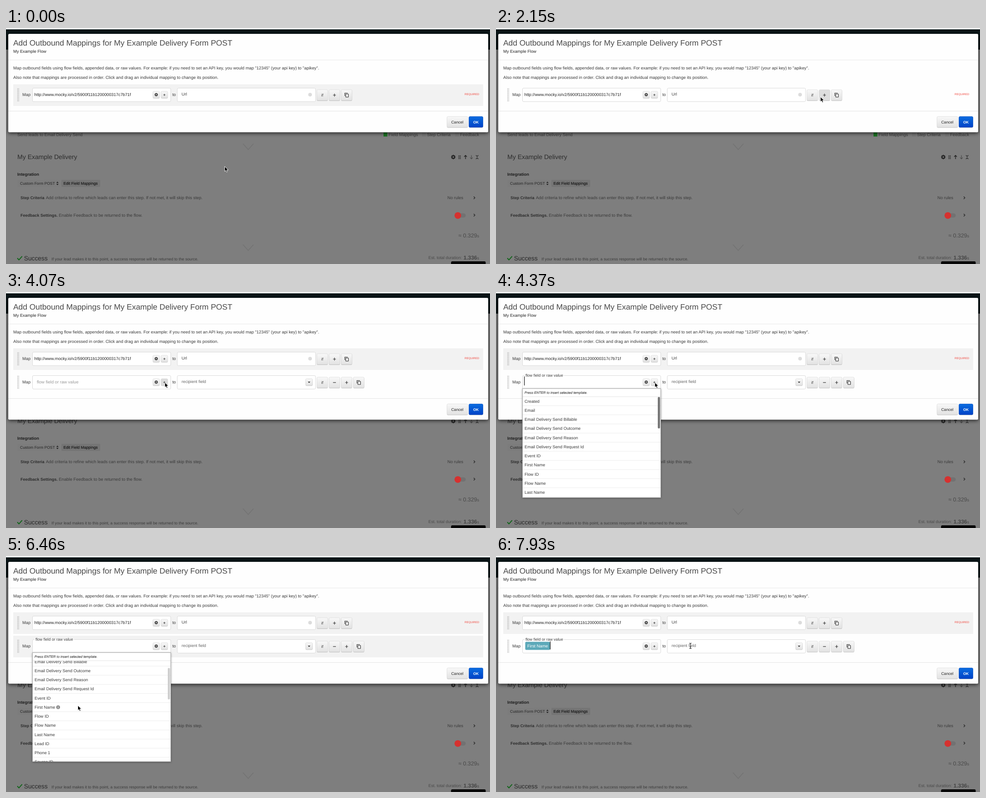
Recreate the animation shown at these times as an HTML page. Size 1068x524 px, loop 8 s.

```html
<!DOCTYPE html>
<html lang="en">
<head>
<meta charset="utf-8">
<title>Outbound mappings</title>
<style>
html, body { margin: 0; width: 100%; height: 100%; overflow: hidden; background: #7e7e7e; }
svg { display: block; width: 1068px; height: 524px; }
text { font-family: "Liberation Sans", Arial, sans-serif; text-rendering: geometricPrecision; white-space: pre; }
#sheet { filter: drop-shadow(0 2px 4px rgba(0,0,0,.75)); }
#panel { filter: drop-shadow(0 1px 2px rgba(0,0,0,.35)); }
</style>
</head>
<body>
<svg id="stage" viewBox="0 0 1068 524" xmlns="http://www.w3.org/2000/svg"></svg>
<script>
const LOOP = 8000, ITEM = 20.24;
const stage = document.getElementById('stage');
const $ = id => document.getElementById(id);

const text = (x, y, size, str, fill = '#3a3a3a', more = '') =>
  `<text x="${x}" y="${y}" font-size="${size}" fill="${fill}" ${more}>${str}</text>`;
const rect = (x, y, w, h, fill, more = '') =>
  `<rect x="${x}" y="${y}" width="${w}" height="${h}" fill="${fill}" ${more}/>`;
const line = (d, stroke, width = 1, more = '') =>
  `<path d="${d}" fill="none" stroke="${stroke}" stroke-width="${width}" ${more}/>`;
const dot = (x, y, r, fill, more = '') => `<circle cx="${x}" cy="${y}" r="${r}" fill="${fill}" ${more}/>`;
const bold = 'font-weight="700"';

function gear(x, y, r, fill) {
  let teeth = '';
  for (let i = 0; i < 8; i++) {
    const a = i * Math.PI / 4, dx = Math.cos(a) * r, dy = Math.sin(a) * r;
    teeth += `M${x + dx * 0.6} ${y + dy * 0.6}L${x + dx} ${y + dy}`;
  }
  return line(teeth, fill, r * 0.4) + dot(x, y, r * 0.56, 'none', `stroke="${fill}" stroke-width="${r * 0.42}"`);
}

function dots(x, y, cols, rows, gap, size, fill) {
  let d = '';
  for (let c = 0; c < cols; c++)
    for (let r = 0; r < rows; r++) d += `M${x + c * gap} ${y + r * gap}h${size}v${size}h${-size}z`;
  return `<path d="${d}" fill="${fill}"/>`;
}

const button = (x, y, w, h, id = '', fill = 'url(#grey)', edge = '#d2d2d2') =>
  rect(x, y + 1, w, h, '#000', 'rx="2.5" opacity=".22"') +
  rect(x, y, w, h, fill, `rx="2.5" stroke="${edge}" stroke-width=".6" ${id && `id="${id}"`}`);
const plus = (x, y, r, w) => line(`M${x - r} ${y}h${2 * r}M${x} ${y - r}v${2 * r}`, '#333', w);
const copy = (x, y) => line(`M${x - 4} ${y + 2}v-6.5h6.5`, '#333', 1.1) +
  rect(x - 2, y - 2.5, 6, 7, 'none', 'rx=".8" stroke="#333" stroke-width="1.1"');
const box = x => rect(x, 133.5, 305, 30, '#fff', 'rx="2.5" stroke="#dadada"');

function mapRow(n) {
  const extra = n === 2;
  let s = rect(16, 125, 1037, 48, '#f2f2f2', `id="band${n}"`) +
    dots(25, 134, 2, 12, 2.5, 1.2, '#a0a0a0') +
    text(36, 151.2, 9.3, 'Map') + box(58.5) + box(378) + text(367, 151.2, 9.4, 'to') +
    button(324, 140.5, 15, 15) + gear(331.5, 148, 3.7, '#333') +
    button(342, 140.5, 15, 15, 'add' + n) + plus(349.5, 148.5, 2.3, 0.9);
  s += extra
    ? text(387.5, 150.2, 9.17, 'recipient field', '#666') + button(661, 140.5, 15.5, 15) +
      '<path d="M666 147h5.6l-2.8 3z" fill="#333"/>'
    : text(62.5, 150.8, 9.26, 'http://www.mocky.io/v2/5900f11b1200000317c7b71f', '#222') +
      text(387.5, 150.2, 9.2, 'Url') + dot(671, 148, 4, '#dcdcdc');
  const tools = extra ? ['if', '-', '+', 'copy'] : ['if', '+', 'copy'];
  tools.forEach((tool, i) => {
    const x = 686 + i * 26.8, c = x + 12, y = 149;
    s += button(x, 137, 24, 24, tool === '+' ? 'plus' + n : '');
    if (tool === 'if') s += text(c, 152, 8.6, 'if', '#333', 'text-anchor="middle"');
    if (tool === '-') s += line(`M${c - 3.2} ${y}h6.4`, '#333', 1.2);
    if (tool === '+') s += plus(c, y, 3.2, 1.2);
    if (tool === 'copy') s += copy(c, y);
  });
  return s;
}

const chevron = y => line(`M523 ${y - 7}L534.5 ${y + 6}L546 ${y - 7}`, '#737373', 1.6);
const next = y => line(`M1032 ${y - 2.7}l2.8 2.7l-2.8 2.7`, '#222', 1.2);

const page =
  rect(0, 0, 1068, 524, '#7e7e7e') + rect(0, 0, 1068, 48, '#0b1618') + rect(0, 0, 1068, 3, '#eef3f1') +
  text(25, 240, 9.35, 'Send leads to Email Delivery Send') +
  rect(833, 232, 8.5, 9, '#1d7524') + text(844, 240, 9.6, 'Field Mappings') +
  rect(918, 232, 8.5, 9, '#787878') + text(929, 240, 9.36, 'Step Criteria') +
  rect(991, 232, 8.5, 9, '#787878') + text(1002, 240, 9.56, 'Feedback') +
  chevron(264) + chevron(488) +
  text(25, 291, 14.05, 'My Example Delivery', '#2c2c2c') +
  gear(987, 286.5, 4.9, '#222') + dots(998.5, 283, 2, 3, 3, 1.8, '#222') +
  line('M1014 291v-8M1011 286l3-3.3l3 3.3', '#222', 1.4) +
  line('M1027 282.5v8M1024 287.5l3 3.3l3-3.3', '#444', 1.1) +
  line('M1037 282.5l2.6 2.8l2.6-2.8M1037 291l2.6-2.8l2.6 2.8', '#222', 1.2) +
  text(25, 327.6, 9.29, 'Integration', '#1c1c1c', bold) +
  rect(25, 337, 94, 16, '#7c7c7c', 'rx="2"') + text(31, 348, 8.5, 'Custom Form POST', '#222') +
  '<path d="M111 344h5l-2.5-3zM111 346h5l-2.5 3z" fill="#222"/>' +
  rect(122, 337, 86, 16, '#757575', 'rx="2"') +
  text(126.7, 348, 8.65, 'Edit Field Mappings', '#1a1a1a', 'stroke="#1a1a1a" stroke-width=".2"') +
  text(32, 380.3, 8.9, 'Step Criteria', '#2c2c2c', bold) +
  text(88, 380.3, 9.43, 'Add criteria to refine which leads can enter this step. If not met, it will skip this step.') +
  text(974, 380.3, 9.4, 'No rules') + next(377) +
  text(32, 419.2, 9, 'Feedback Settings.', '#2c2c2c', bold) +
  text(116.5, 419.2, 9.54, 'Enable Feedback to be returned to the flow.') +
  rect(994, 411.5, 20.5, 9.5, '#727272', 'rx="4.7"') + dot(997, 416.3, 7.4, '#d6312f') + next(415.5) +
  text(1044, 464.5, 12.4, '≈ 0.329<tspan font-size="9">s</tspan>', '#4a4a4a', 'text-anchor="end"') +
  line('M25 511l3.6 3.8l7-8', '#0d6516', 1.9) + text(39.7, 516, 13.8, 'Success', '#282828') +
  text(100.5, 516, 8.73, 'If your lead makes it to this point, a success response will be returned to the source.') +
  text(932, 513.2, 9.2, 'Est. total duration:', '#4a4a4a') +
  text(1044, 513.6, 12, '1.336<tspan font-size="9" font-weight="400">s</tspan>', '#464646', bold + ' text-anchor="end"') +
  rect(982, 518, 76.5, 12, '#080808', 'rx="3"');

const footer =
  line('M5 184.5H1064', '#e4e4e4') +
  button(973, 196.5, 46, 24) + text(982.4, 211.7, 8.65, 'Cancel', '#222') +
  button(1021.5, 196.5, 31, 24, '', 'url(#blue)', '#0040b4') + text(1031, 211.7, 8.1, 'OK', '#fff', bold);

const modal =
  rect(5, 13, 1059, 218.5, '#fefefe', 'id="sheet" rx="2.5"') +
  text(16, 39, 17.4, 'Add Outbound Mappings for My Example Delivery Form POST', '#484848') +
  text(16, 55, 9.25, 'My Example Flow', '#222') + line('M5 71H1064', '#e8e8e8') +
  text(16, 92.3, 9.39, 'Map outbound fields using flow fields, appended data, or raw values. For example: ' +
    'if you need to set an API key, you would map "12345" (your api key) to "apikey".') +
  text(16, 113.3, 9.47, 'Also note that mappings are processed in order. Click and drag an individual mapping to change its position.') +
  mapRow(1) + text(1012, 149.4, 6.1, 'REQUIRED', '#f0453c') +
  `<g id="row2">${mapRow(2)}` +
  text(68, 151, 9.57, 'flow field or raw value', '#999', 'id="hint"') +
  '<g id="label">' + rect(63, 131.5, 87, 4, '#fff') + text(65, 136, 8.63, 'flow field or raw value') + '</g>' +
  '<g id="chip">' + rect(64.5, 138.5, 54.5, 18, '#5ca9b9', 'rx="2.5"') + text(69, 150.8, 9.4, 'First Name', '#fff') + '</g>' +
  rect(62, 135, 1.2, 20, '#111', 'id="caret"') + '</g>' +
  `<g id="footer">${footer}</g>`;

const names = ['Created', 'Email', 'Email Delivery Send Billable', 'Email Delivery Send Outcome',
  'Email Delivery Send Reason', 'Email Delivery Send Request Id', 'Event ID', 'First Name', 'Flow ID',
  'Flow Name', 'Last Name', 'Lead ID', 'Phone 1', 'Source ID'];
const items = names.map((name, i) => {
  const y = 242.5 + i * ITEM;
  return text(63, y + 3.2, 9.28, name) + line(`M59 ${y + 10}H363`, '#ececec');
}).join('');
const info = (id, x, i) => {
  const y = 242.5 + i * ITEM;
  return `<g id="${id}">${dot(x, y, 4.3, '#8b8b8b')}${line(`M${x} ${y - 2.4}v1.2M${x} ${y - 0.5}v3`, '#fff', 1.1)}</g>`;
};
const list = '<g id="list">' +
  rect(58.5, 214.5, 305, 242, '#fff', 'id="panel" stroke="#a5a5a5"') +
  text(63, 226, 7.53, 'Press ENTER to insert selected template.', '#444',
    'font-style="italic" stroke="#444" stroke-width=".15"') +
  line('M59 232.5H363', '#e4e4e4') +
  `<g clip-path="url(#view)"><g id="items">${items}${info('info1', 187.5, 4)}${info('info2', 115, 7)}</g></g>` +
  rect(357, 233, 5, 70, '#777', 'id="thumb" rx="2.5"') + '</g>';

const cursors =
  '<g id="arrow"><path d="M0 0V10.8L2.5 8.5L4.2 12.4L6.2 11.5L4.5 7.7H8Z" fill="#000" stroke="#fff" stroke-width=".9"/></g>' +
  '<g id="hand"><path d="M0 .2C1.2-.4 2 .4 2 1.4V5L5 5.3L7.5 6.2Q8.4 6.7 8.2 8L7.4 11V13H1.2V11.6L-2.8 7.6Q-3.4 6.4-2.2 6L0 7.2Z" ' +
  'fill="#fff" stroke="#000" stroke-width="1"/><path d="M2.8 8.5v2.5M4.5 8.5v2.5M6 8.5v2.5" stroke="#000" stroke-width=".6"/></g>' +
  '<g id="beam">' +
  ['#fff', '#111'].map((c, i) => line('M-2.5-6Q0-6 0-4.5Q0-6 2.5-6M0-4.5V4.5M-2.5 6Q0 6 0 4.5Q0 6 2.5 6M-1.5 2h3', c, i ? 1.1 : 2.4)).join('') + '</g>';

const gradient = (id, a, b) => `<linearGradient id="${id}" x1="0" y1="0" x2="0" y2="1">
  <stop offset="0" stop-color="${a}"/><stop offset="1" stop-color="${b}"/></linearGradient>`;
stage.innerHTML = `<defs>${gradient('grey', '#f8f8f8', '#e2e2e2')}${gradient('blue', '#0a6ce0', '#0042c6')}
  <clipPath id="view"><rect x="59" y="233" width="304" height="223.5"/></clipPath></defs>` +
  page + modal + list + cursors;

// Screen updates arrive in steps: n of them from t0 to t1, the first one at t0.
function progress(t, t0, t1, n) {
  if (t < t0) return 0;
  const k = Math.floor((t - t0) / (t1 - t0) * (n - 1) + 0.02) + 1;
  return Math.min(k, n) / n;
}
const smooth = p => p * p * (3 - 2 * p);
const out = p => 1 - (1 - p) * (1 - p);
const moves = [
  { at: [600, 1550, 7], to: [710, 157], ease: smooth },
  { at: [1700, 1850, 2], to: [716, 153], ease: out },
  { at: [2600, 3190, 5], to: [570, 219], ease: smooth },
  { at: [3330, 3780, 4], to: [350.5, 201], ease: out },
  { at: [4810, 5260, 4], to: [237, 328.5], ease: smooth },
  { at: [5730, 6160, 4], to: [158.5, 332], ease: smooth },
  { at: [7040, 7340, 3], to: [380, 241], ease: smooth },
  { at: [7640, 7930, 3], to: [429, 199.5], ease: out }
];

function pointer(t) {
  let [x, y] = [482.5, 307.5];
  for (const m of moves) {
    const p = m.ease(progress(t, ...m.at));
    x += (m.to[0] - x) * p;
    y += (m.to[1] - y) * p;
  }
  return [x, y];
}

const within = (t, a, b) => t >= a && t < b;
const show = (id, on) => $(id).setAttribute('display', on ? 'inline' : 'none');
const set = (id, key, value) => $(id).setAttribute(key, value);

function draw(t) {
  const added = t >= 2300, open = within(t, 4230, 6600), chosen = t >= 6600;
  const drop = !added ? 0 : t < 2450 ? 51 : 52;
  show('row2', added);
  set('row2', 'transform', `translate(0 ${drop})`);
  set('footer', 'transform', `translate(0 ${drop})`);
  set('sheet', 'height', 218.5 + drop);

  set('band1', 'opacity', 1 - progress(t, 1700, 1850, 2) + progress(t, 2900, 3050, 2));
  set('band2', 'opacity', 1 - progress(t, 3330, 3480, 2) + progress(t, 4810, 4960, 2) - progress(t, 7780, 7930, 2));
  set('plus1', 'fill', within(t, 2150, 2300) ? '#dedede' : within(t, 2300, 2750) ? '#fff' : 'url(#grey)');
  set('add2', 'fill', within(t, 4070, 4230) ? '#dcdcdc' : 'url(#grey)');

  show('hint', t < 4230);
  show('label', open || chosen);
  show('chip', chosen);
  show('caret', within(t, 2300, 2900) || within(t, 3330, 3780) || within(t, 4230, 4810) ||
    within(t, 6600, 7040) || t >= 7640);
  set('caret', 'x', chosen ? 119 : 62);
  set('caret', 'height', chosen ? 18 : 20);
  set('caret', 'y', chosen ? 137.5 : 135.5);

  const scroll = (t >= 5590 ? ITEM : 0) + 28.2 * out(progress(t, 5730, 6160, 4));
  show('list', open);
  set('items', 'transform', `translate(0 ${-scroll})`);
  set('thumb', 'y', 233 + scroll * 0.32);
  set('thumb', 'fill', t < 6460 ? '#777' : '#cfcfcf');
  show('info1', within(t, 5260, 6160));
  show('info2', t >= 6160);

  const [x, y] = pointer(t);
  const hand = within(t, 4960, 6460), beam = t >= 7640 && y < 215;
  show('hand', hand);
  show('beam', beam);
  show('arrow', !hand && !beam);
  for (const id of ['arrow', 'hand', 'beam']) set(id, 'transform', `translate(${x} ${y})`);
}

const start = performance.now();
function tick() {
  draw((performance.now() - start) % LOOP);
  requestAnimationFrame(tick);
}
tick();
</script>
</body>
</html>
```
